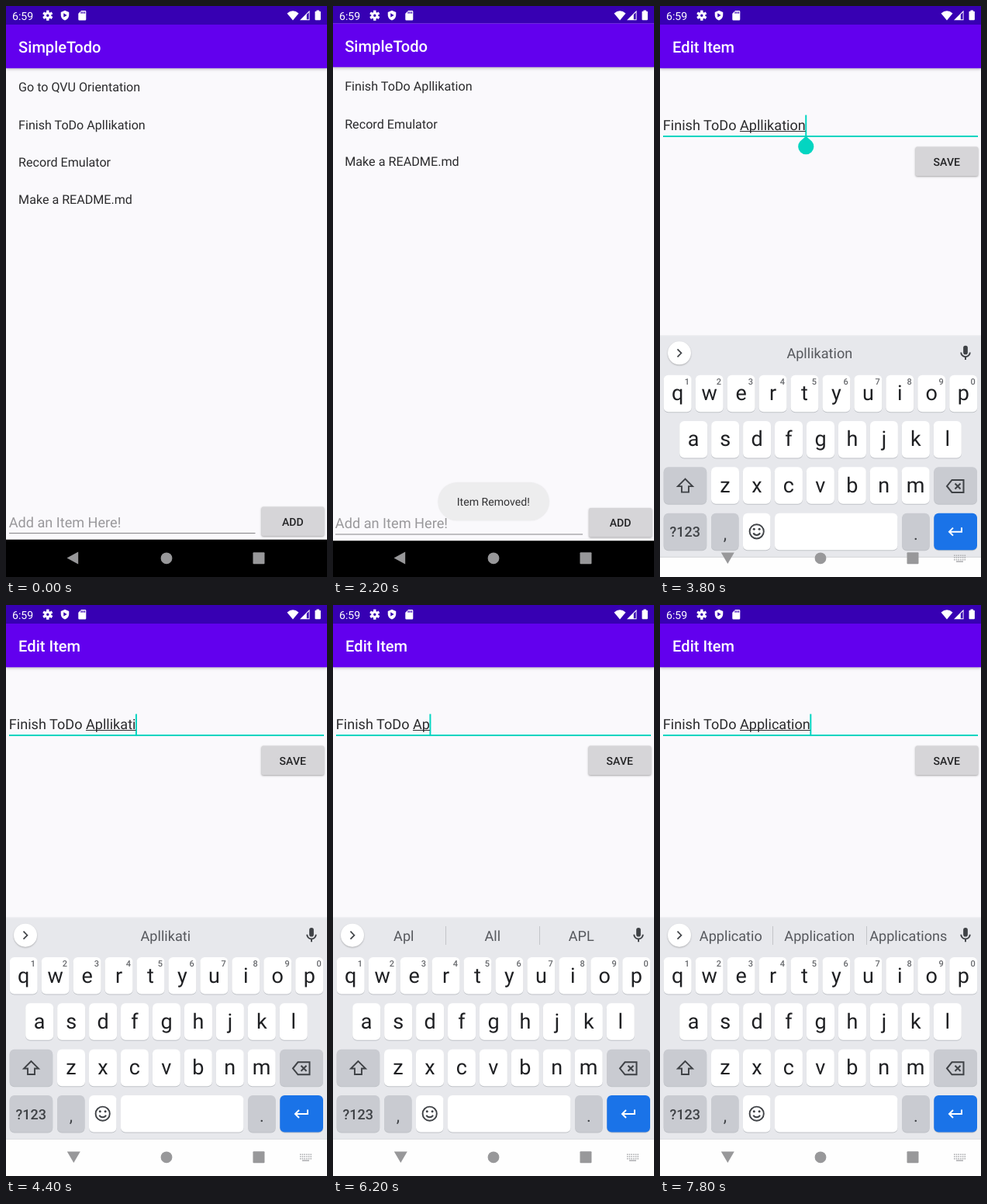
Write an HTML page with a canvas that moves like this. It is 414x736 px and loops after 8 s.

```html
<!DOCTYPE html>
<html lang="en">
<head>
<meta charset="utf-8">
<title>Todo list</title>
<style>
  html, body { margin: 0; width: 414px; height: 736px; overflow: hidden; background: #faf9fc; }
  canvas { display: block; }
</style>
</head>
<body>
<canvas id="stage" width="414" height="736"></canvas>
<script>
const ctx = document.getElementById('stage').getContext('2d');
const LOOP = 8000, W = 414, H = 736;
const PAPER = '#faf9fc', INK = '#2b2b2d', TEAL = '#03d5c1', NAV_GREY = '#98989a';
const ITEMS = ['Go to QVU Orientation', 'Finish ToDo Apllikation', 'Record Emulator', 'Make a README.md'];
const FOCUS = 3390, KEYBOARD = 3700, SUGGEST_LAG = 150;

// Every edit of the last word: first backspaces, then typing.
const edits = [[FOCUS, 'Apllikation']];
[4060, 4240, 4460, 4750, 4960, 5160, 5370, 5850, 6170]
  .forEach((time, i) => edits.push([time, 'Apllikation'.slice(0, 10 - i)]));
[6550, 6650, 6780, 6890, 6990, 7090, 7220, 7350, 7450]
  .forEach((time, i) => edits.push([time, 'Application'.slice(0, 3 + i)]));
const editAt = t => edits.filter(e => e[0] <= t).pop() || edits[0];

const SUGGESTIONS = {
  Apll: ['Apll', 'All', 'Apply'],
  Apl: ['Apl', 'All', 'APL'],
  Ap: ['Ap', 'App', 'APL'],
  App: ['App', 'Apps', 'Apply'],
  Appl: ['Appl', 'Apply', 'Applied']
};
function suggest(word) {
  if (word.startsWith('Appli')) return [word.slice(0, 10), 'Application', 'Applications'];
  return SUGGESTIONS[word] || ['', word, ''];
}

const clamp = x => Math.min(1, Math.max(0, x));
const progress = (t, start, length) => clamp((t - start) / length);
const smooth = x => (1 - Math.cos(Math.PI * x)) / 2;
const slide = x => x < 1 / 6 ? 0.4 * (6 * x) ** 2.5 : 1 - 0.6 * (1.2 - 1.2 * x) ** 8;

function rect(x, y, w, h, color, radius = 0) {
  ctx.fillStyle = color;
  ctx.beginPath();
  ctx.roundRect(x, y, w, h, radius);
  ctx.fill();
}
function circle(x, y, r, color) {
  rect(x - r, y - r, 2 * r, 2 * r, color, r);
}
function text(str, x, y, size, color, weight = 400, align = 'left') {
  ctx.font = `${weight} ${size}px Roboto, sans-serif`;
  ctx.textAlign = align;
  ctx.fillStyle = color;
  ctx.fillText(str, x, y);
}
// Draws a path on a 24 unit grid centred at x, y.
function icon(path, x, y, size, color, line = 0) {
  ctx.save();
  ctx.translate(x, y);
  ctx.scale(size / 24, size / 24);
  ctx.translate(-12, -12);
  ctx.fillStyle = ctx.strokeStyle = color;
  ctx.lineWidth = line;
  if (line) ctx.stroke(new Path2D(path));
  else ctx.fill(new Path2D(path), 'evenodd');
  ctx.restore();
}
function shadowed(blur, offset, color, draw) {
  ctx.save();
  ctx.shadowBlur = blur;
  ctx.shadowOffsetY = offset;
  ctx.shadowColor = color;
  draw();
  ctx.restore();
}

function frame(title) {
  rect(0, 0, W, H, PAPER);
  shadowed(4, 1, 'rgba(0,0,0,.3)', () => rect(0, 24, W, 56.3, '#6200ee'));
  rect(0, 0, W, 24, '#3700b3');
  text(title, 16.1, 60.2, 20.1, '#fff', 500);
  rect(0, 687.7, W, 49, '#000');
}
function button(label, y) {
  shadowed(2.5, 1, 'rgba(0,0,0,.35)', () => rect(329.5, y, 80.7, 37.5, '#d6d5d8', 2));
  text(label, 369.8, y + 24, 14.1, '#242426', 500, 'center');
}
function listScreen(t) {
  frame('SimpleTodo');
  const lift = smooth(progress(t, 600, 260)) * 48.3;
  const base = ctx.globalAlpha;
  ITEMS.forEach((item, i) => {
    ctx.globalAlpha = i ? base : base * (1 - progress(t, 480, 120));
    text(item, 16.1, 110.4 + i * 48.3 - (i && lift), 16.1, INK);
  });
  ctx.globalAlpha = base;
  text('Add an Item Here!', 3.8, 671.6, 18.1, '#99989b');
  rect(4, 679, 317.5, 1, '#858487');
  button('ADD', 645.5);
}
function editScreen(t) {
  frame('Edit Item');
  const [edited, word] = editAt(t);
  const prefix = 'Finish ToDo ', baseline = 159.8;
  text(prefix + word, 3.8, baseline, 18.1, INK);
  const start = 3.8 + ctx.measureText(prefix).width;
  const end = 3.8 + ctx.measureText(prefix + word).width;
  if (t >= FOCUS) {
    rect(4, 167, 406, 2, TEAL);
    if ((t - edited) % 1000 < 500) rect(end - 0.5, 140.5, 2, 27, TEAL);
    if (t < edits[1][0]) icon('M12 0 L20.5 7.5 A11.3 11.3 0 1 1 3.5 7.5Z', end + 0.5, 178.5, 21.5, TEAL);
  } else {
    rect(4, 167, 406, 1, '#6d6c6f');
  }
  if (t >= KEYBOARD) rect(start, 161, end - start, 1, INK);
  button('SAVE', 181.5);
}

function key(x, y, w, label, color = '#fff') {
  rect(x, y + 1, w, 47.5, '#bfc2c7', 6);
  rect(x, y, w, 47.5, color, 6);
  if (label) text(label, x + w / 2, y + 32.5, 27, '#1f2023', 400, 'center');
}
function keyboard(t) {
  const grey = '#c9cbd1', dark = '#3f4246';
  rect(0, 402.5, W, 286, '#e7e8ec');
  rect(0, 402.5, W, 1, '#f0f0f3');
  rect(0, 688.5, W, 50, '#fefefe');
  rect(0, 688, W, 1, '#dcdde0');

  shadowed(2, 1, 'rgba(0,0,0,.25)', () => circle(25, 425.7, 15, '#fff'));
  icon('M9 6l6 6l-6 6', 25, 425.7, 20, dark, 2);
  const words = suggest(editAt(t - SUGGEST_LAG)[1]);
  words.forEach((word, i) => text(word, 91.3 + i * 114.5, 432.6, 18.1, '#56585d', 400, 'center'));
  if (words[0]) [145, 266].forEach(x => rect(x, 414, 1, 24, '#c3c5c9'));
  icon('M12 14a3 3 0 0 0 3-3V5a3 3 0 0 0-6 0v6a3 3 0 0 0 3 3zM17 11a5 5 0 0 1-10 0H5a7 7 0 0 0 6 6.9V21h2v-3.1a7 7 0 0 0 6-6.9z',
    394, 425.7, 23, dark);

  [['qwertyuiop', 4.7, 454], ['asdfghjkl', 25.2, 513.3], ['zxcvbnm', 66, 572.7]].forEach(([row, x, y]) =>
    [...row].forEach((letter, i) => key(x + i * 40.95, y, 36, letter)));
  [...'1234567890'].forEach((digit, i) => text(digit, 35 + i * 40.95, 466, 11, '#66686c', 500, 'center'));

  key(4.7, 572.7, 55.5, '', grey);
  icon('M12 3L2.5 12.5H7.5V20H16.5V12.5H21.5Z', 32.5, 597, 24, dark, 1.9);
  key(353.3, 572.7, 55.7, '', grey);
  icon('M8 4H23V20H8L1.5 12ZM12 8.5l7 7M19 8.5l-7 7', 380.5, 597.3, 24, dark, 2);

  const y = 632;
  key(4.7, y, 55.5, '', grey);
  text('?123', 32.3, y + 30.5, 18, dark, 500, 'center');
  key(66, y, 35.5, '', grey);
  text(',', 83.8, y + 34, 22, dark, 400, 'center');
  key(107, y, 35.5);
  icon('M21.5 12a9.5 9.5 0 1 1-19 0a9.5 9.5 0 1 1 19 0M7.5 14a5 5 0 0 0 9 0', 124.7, y + 23.7, 23, dark, 2);
  circle(121.3, y + 20.7, 1.5, dark);
  circle(128.1, y + 20.7, 1.5, dark);
  key(148, y, 158.5);
  key(312.2, y, 35.5, '', grey);
  text('.', 330, y + 34, 22, dark, 400, 'center');
  key(353.3, y, 55.7, '', '#1a73e8');
  icon('M20 7V12.5H4M9 7.5L4 12.5L9 17.5', 381, y + 23.5, 24, '#fff', 2);
}

function statusBar() {
  text('6:59', 8, 17.8, 14.1, '#fff');
  const white = '#fff';
  icon('M17 12a5 5 0 1 1-10 0a5 5 0 1 1 10 0', 53.8, 12.2, 15, white, 4.5);
  for (let i = 0; i < 6; i++) {
    ctx.save();
    ctx.translate(53.8, 12.2);
    ctx.rotate(i * Math.PI / 3);
    rect(-1.7, -6.6, 3.4, 3, white);
    ctx.restore();
  }
  icon('M12 1L3 5v6c0 5.5 3.8 10.7 9 12c5.2-1.3 9-6.5 9-12V5zM9 7v9l7.5-4.5z', 76, 12.2, 14, white);
  icon('M18 2h-8L4 8v12a2 2 0 0 0 2 2h12a2 2 0 0 0 2-2V4a2 2 0 0 0-2-2zM9 8h2V4h-2zM12.5 8h2V4h-2zM16 8h2V4h-2z', 98.3, 12.2, 15, white);
  icon('M12 22L0 7.5Q12-2.5 24 7.5Z', 370, 12.2, 15, white);
  icon('M2 22H22V2ZM16 20.5H20.5V6L16 10.5Z', 385.3, 12, 15, white);
  rect(398.5, 6.8, 7.4, 11.5, white, 1);
  rect(400.5, 5.5, 3.4, 2, white);
}
function navBar(typing) {
  icon(typing ? 'M0 2H24L12 22.5Z' : 'M22 0V24L0 12Z', typing ? 87.3 : 86.5, 711.5, typing ? 17 : 16, NAV_GREY);
  circle(207, 711.8, 7.4, NAV_GREY);
  rect(318.5, 704.3, 15, 15, NAV_GREY, 1);
  if (!typing) return;
  for (let row = 0; row < 3; row++)
    for (let col = 0; col < 6; col++) rect(379 + col * 2.7, 707.5 + row * 2.7, 1.6, 1.6, '#adaeb1');
  rect(382, 715.4, 9, 1.5, '#adaeb1');
}
function layer(alpha, scale, shift, draw) {
  if (alpha <= 0) return;
  ctx.save();
  ctx.globalAlpha = alpha;
  ctx.translate(W / 2, H / 2 + shift);
  ctx.scale(scale, scale);
  ctx.translate(-W / 2, -H / 2);
  draw();
  ctx.restore();
}
function toast() {
  shadowed(2, 0, 'rgba(0,0,0,.08)', () => rect(135.5, 614.3, 143.3, 49, '#ededee', 24.5));
  text('Item Removed!', 206.8, 644, 14.1, '#323234', 400, 'center');
}

function draw(t) {
  const open = slide(progress(t, 2160, 425));
  const fadeIn = progress(t, 2203, 50);
  if (fadeIn < 1 || open < 1) layer(1, 1 + 0.05 * open, 0, () => listScreen(t));
  layer(fadeIn, 0.85 + 0.15 * open, 0, () => editScreen(t));
  const rise = 34 * (1 - progress(t, KEYBOARD, 500)) ** 2;
  layer(progress(t, KEYBOARD - 30, 60), 1, rise, () => keyboard(t));
  const toastIn = 1 - (1 - progress(t, 620, 400)) ** 2;
  layer(toastIn * (1 - progress(t, 2480, 370) ** 2), 1, 0, toast);
  statusBar();
  navBar(t >= KEYBOARD);
}

ctx.textRendering = 'geometricPrecision';
const began = performance.now();
function tick() {
  draw((performance.now() - began) % LOOP);
  requestAnimationFrame(tick);
}
tick();
</script>
</body>
</html>
```
